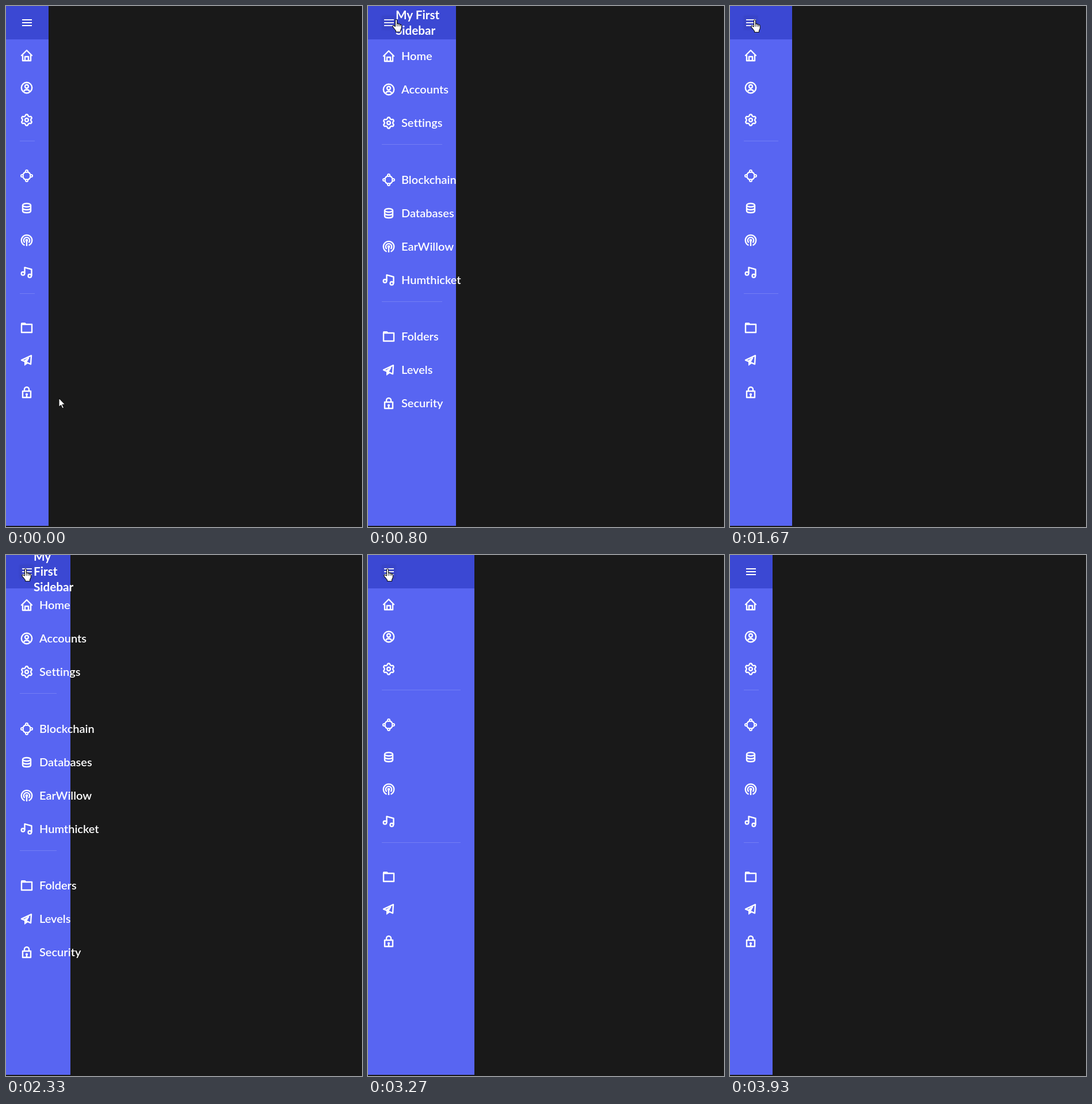
Recreate the animation shown at these times as an HTML page. Size 619 by 905 pixels, loop 4190 ms.

```html
<!DOCTYPE html>
<html lang="en">
<head>
<meta charset="utf-8">
<title>Sidebar</title>
<style>
  html, body { margin: 0; width: 100%; height: 100%; overflow: hidden; background: #191919; }
  body {
    position: relative; color: #fff; font: 600 20px/26.6px Lato, "Open Sans", sans-serif;
    font-variant-ligatures: none;
  }
  #sidebar { position: absolute; left: 0; top: 0; height: 903px; background: #5865f2; }
  header {
    display: flex; justify-content: space-between; align-items: center;
    box-sizing: border-box; height: 58px; padding: 0 24px; background: #3b48d3;
  }
  svg { display: block; overflow: visible; fill: none; stroke: #fff; stroke-width: 2.4; }
  svg .solid { fill: #fff; stroke: none; }
  header svg { flex: none; }
  #title { position: relative; top: -.5px; font-weight: 700; font-size: 20.7px; }
  .hover svg { background: #0000000f; box-shadow: 0 0 5px #00000012; opacity: .88; }
  .item { position: absolute; left: 24px; height: 24px; white-space: nowrap; }
  .item svg { stroke-linejoin: round; }
  .item span { position: absolute; left: 34px; top: -2px; }
  .closed span, .closed #title { display: none; }
  .rule { position: absolute; left: 24px; right: 24px; height: 1px; background: #ffffff29; }
  #cursor { position: absolute; left: 0; top: 0; stroke: #111; stroke-width: 1.1; stroke-linejoin: round; }
  #cursor path { fill: #fff; }
</style>
</head>
<body>
<div id="sidebar">
  <header id="header">
    <svg width="24" height="24"><path d="M4 7h17M4 12h17M4 17h17" stroke-width="2"/></svg>
    <div id="title">My First Sidebar</div>
  </header>
</div>
<svg id="cursor" width="18" height="24">
  <path id="arrow" d="M0 0v15.6l3.5-3.3 2.5 5.6 2.5-1.1-2.5-5.4h5z"/>
  <g id="hand">
    <path d="M5.5 13V2.5a1.5 1.5 0 0 1 3 0V9c0-1.8 2.7-1.8 2.7 0v.8c0-1.7 2.6-1.7 2.6.3v.8c0-1.5 2.5-1.5 2.5.4V16l-1.8 4v2.5h-8v-2L1 13.6c-1-1.6 1-3 2.4-1.6z"/>
    <path d="M8.5 9v4M11.2 9.8V13M13.8 10.9V13" stroke-width=".8"/>
  </g>
</svg>
<script>
const LOOP = 4190, SLIDE = 300, CLOSED = 74, OPEN = 246;
const byId = id => document.getElementById(id);
const path = (d, extra = '') => `<path d="${d}" ${extra}/>`;
const ring = (x, y, r, extra = '') => `<circle cx="${x}" cy="${y}" r="${r}" ${extra}/>`;
const solid = 'class="solid"';

const cog = Array.from({ length: 60 }, (_, i) => {
  const a = i * Math.PI / 30;
  const r = 8.4 + 1.2 * Math.tanh(2 * Math.cos(6 * a));
  return `${(12 + r * Math.sin(a)).toFixed(2)} ${(12 - r * Math.cos(a)).toFixed(2)}`;
}).join('L');

const chain = [0, 90, 180, 270].map(angle => `<g transform="rotate(${angle} 12 12)">` +
  ring(12, 4, 2, 'stroke-width="2"') + path('M13.9 5.2A9 9 0 0 1 18.8 10.1') + '</g>').join('');

// Label, group and icon of each row
const items = [
  ['Home', 0, path('M3 12l9-9 9 9', 'stroke-linecap="round"') + path('M5 11v10h14V11M9 21v-7h6v7')],
  ['Accounts', 0, ring(12, 12, 9.2) + ring(12, 9.8, 3) +
    path('M7.1 18.5A4 4 0 0 1 11 15.5h2a4 4 0 0 1 3.9 3')],
  ['Settings', 0, path(`M${cog}Z`) + ring(12, 12, 3)],
  ['Blockchain', 1, chain],
  ['Databases', 1, '<ellipse cx="12" cy="7" rx="7" ry="3"/>' +
    path('M5 7v10c0 1.7 3 3 7 3s7-1.3 7-3V7M5 12c0 1.7 3 3 7 3s7-1.3 7-3')],
  ['EarWillow', 1, path('M8.5 20.6a9.2 9.2 0 1 1 7 0M8.6 16a5.2 5.2 0 1 1 6.8 0') +
    ring(12, 12, 2.4, solid) + path('M12 12v10')],
  ['Humthicket', 1, ring(5.5, 13.8, 2.8) + ring(17.3, 17.8, 2.8) + path('M8.5 14V3.2l12 3.3V18')],
  ['Folders', 2, path('M3 6h18v14H3z') + path('M2 7V4.5A1.5 1.5 0 0 1 3.5 3H9.2l2.4 2.4z', solid)],
  ['Levels', 2, path('M8.5 14.4L3 12.2l17-8-1 15-7-3') +
    path('M8 15.4V22l5.8-4-1.4-2.6 3.9-6.6a1 1 0 0 0-1.4-1.2l-8.3 6z', solid)],
  ['Security', 2, path('M5 10h14v11H5zM8 10V7a4 4 0 0 1 8 0v3') +
    ring(12, 15.6, 2.1, solid) + path('M12 16v4')],
];

const sidebar = byId('sidebar');
const add = (className, html = '') => {
  const el = document.createElement('div');
  el.className = className;
  el.innerHTML = html;
  return sidebar.appendChild(el);
};
const rows = items.map(([label, group, icon]) => ({
  group, el: add('item', `<svg width="24" height="24">${icon}</svg><span>${label}</span>`),
}));
const rules = [add('rule'), add('rule')];

const clicks = [[718, true], [1520, false], [2280, true], [3202, false]];

// Cursor keys: time, x, y
const route = [
  [0, 92, 681], [130, 90, 640], [270, 75, 400], [400, 55, 130], [530, 47, 23],
  [600, 42, 22.5], [1070, 42, 22.5], [1130, 41.5, 23], [1270, 41.5, 23], [1470, 36, 23],
  [1930, 36, 23], [2070, 27, 23], [3330, 27, 23], [3400, 28, 70], [3470, 20, 180],
  [3600, 11, 540], [3670, 14, 720], [3730, 20, 841], [3800, 24, 866], [3870, 30, 890],
  [3930, 32, 920], [LOOP, 32, 920],
];

// Same curve as the CSS keyword "ease"
function ease(x) {
  const bez = (s, a, b) => 3 * s * (1 - s) ** 2 * a + 3 * s * s * (1 - s) * b + s ** 3;
  let lo = 0, hi = 1;
  for (let i = 0; i < 24; i++) {
    const mid = (lo + hi) / 2;
    if (bez(mid, .25, .25) < x) lo = mid; else hi = mid;
  }
  return bez(lo, .1, 1);
}

function cursorAt(t) {
  const i = route.findIndex(key => key[0] > t);
  const [t0, x0, y0] = route[i - 1], [t1, x1, y1] = route[i];
  const p = (t - t0) / (t1 - t0);
  return [x0 + (x1 - x0) * p, y0 + (y1 - y0) * p];
}

// Fifteen pictures a second, on a 10 ms clock
function snap(t) {
  const rest = t % 200;
  return t - rest + (rest < 70 ? 0 : rest < 130 ? 70 : 130);
}

function render(t) {
  const [start, open] = clicks.filter(c => c[0] <= t).pop() || [-SLIDE, false];
  const p = ease(Math.min(1, (t - start) / SLIDE));
  sidebar.style.width = CLOSED + (OPEN - CLOSED) * (open ? p : 1 - p) + 'px';
  sidebar.className = open ? '' : 'closed';

  const first = open ? 87 : 86, pitch = open ? 58 : 56;
  rows.forEach(({ el, group }, i) => {
    el.style.top = first + pitch * i + 40.5 * group - 12 + 'px';
  });
  rules.forEach((el, i) => {
    el.style.top = (open ? [240, 513] : [234, 499])[i] + 'px';
  });

  const [x, y] = cursorAt(t);
  const hand = t >= 600 && t < 3400;
  byId('cursor').style.transform = `translate(${x}px, ${y}px)`;
  byId('hand').style.display = hand ? '' : 'none';
  byId('arrow').style.display = hand ? 'none' : '';
  byId('header').className = hand ? 'hover' : '';
}

const began = performance.now();
function tick() {
  render(snap((performance.now() - began) % LOOP));
  requestAnimationFrame(tick);
}
tick();
</script>
</body>
</html>
```
